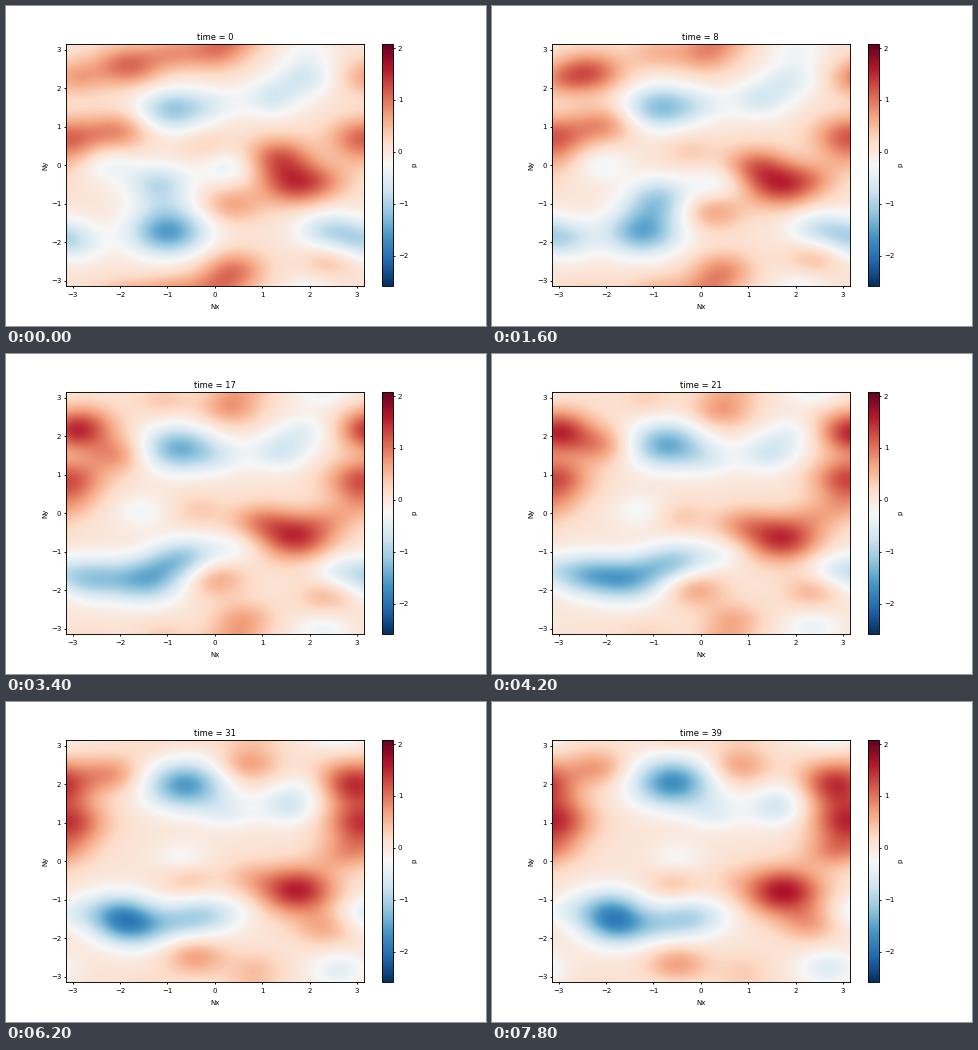
Recreate the animation shown at these times as a matplotlib script. Size 480 by 320 pixels, loop 8 s.

```python
import numpy as np
import matplotlib.pyplot as plt
from matplotlib.animation import FuncAnimation

W, H, DPI = 480, 320, 50
FRAMES, STEP_MS = 40, 200
VMIN, VMAX = -2.58, 2.07
BASE = 0.05
STRETCH = 1.15

plt.rcParams.update({
    "font.family": "DejaVu Sans",
    "axes.linewidth": 1.3,
    "xtick.major.width": 1.3,
    "ytick.major.width": 1.3,
    "xtick.major.pad": 5.5,
})

axis = np.linspace(-np.pi, np.pi, 128)
X, Y = np.meshgrid(axis, axis)


def ease_out(u):
    return np.sin(np.pi * u / 2)


def smooth(u):
    return u * u * (3 - 2 * u)


def wrap(d):
    return (d + np.pi) % (2 * np.pi) - np.pi


def vortex(start, end, strength, ease=smooth):
    """A periodic bump drifting from start to end; stronger ones are wider."""
    start, end = np.array(start), np.array(end)

    def value(u):
        x, y = start + (end - start) * ease(u)
        a = strength[0] + (strength[1] - strength[0]) * u
        r = 0.45 + 0.17 * abs(a)
        dx, dy = wrap(X - x) / STRETCH, wrap(Y - y) * STRETCH
        return a * np.exp(-(dx * dx + dy * dy) / r ** 2)

    return value


VORTICES = [
    # warm, upper half
    vortex((-1.85, 2.6), (-3.45, 2.05), (1.0, 1.3), ease_out),
    vortex((3.14, 0.7), (3.14, 1.05), (1.0, 1.4)),
    vortex((3.2, 0.1), (3.1, 0.3), (0.2, 0.5)),
    vortex((-2.05, 0.9), (-2.2, 2.45), (0.75, 0.65)),
    vortex((3.3, 2.3), (3.1, 1.7), (0.6, 0.1)),
    vortex((0.0, 2.95), (0.8, 2.5), (0.7, 0.65)),
    vortex((-0.9, 2.95), (-1.4, 3.0), (0.55, 0.0)),
    vortex((-0.2, 0.5), (-0.6, -0.6), (0.25, 0.35)),
    # warm, lower half
    vortex((1.35, 0.2), (0.7, -0.45), (1.0, 0.15), ease_out),
    vortex((1.7, -0.5), (1.75, -0.8), (1.2, 1.6)),
    vortex((2.4, -0.4), (2.6, 0.2), (0.35, 0.35)),
    vortex((0.35, -1.05), (-0.5, -2.7), (0.6, 0.65)),
    vortex((0.4, -2.75), (0.9, -2.85), (0.85, 0.25)),
    vortex((2.45, -2.5), (2.3, -1.65), (0.4, 0.55)),
    # cold, upper half
    vortex((-0.9, 1.45), (-0.6, 2.05), (-1.15, -1.75)),
    vortex((0.0, 1.6), (0.3, 1.25), (-0.35, -0.45)),
    vortex((1.2, 1.75), (1.6, 1.4), (-0.65, -0.7)),
    vortex((1.9, 2.3), (1.9, 1.9), (-0.65, -0.2)),
    vortex((2.0, 3.0), (2.7, 3.47), (-0.3, -0.6)),
    vortex((-2.3, 0.0), (-0.5, 0.1), (-0.4, -0.3)),
    # cold, lower half
    vortex((-1.0, -1.75), (-1.75, -1.75), (-1.6, -1.0), ease_out),
    vortex((-3.1, -2.0), (-1.95, -1.3), (-0.85, -1.3)),
    vortex((-1.2, -0.5), (-0.25, -1.5), (-0.9, -0.95), ease_out),
    vortex((-1.05, -1.1), (-0.95, -1.7), (-0.2, -0.4)),
    vortex((0.3, -0.05), (0.5, -1.4), (-0.5, -0.15), ease_out),
    vortex((2.4, -1.7), (3.2, -1.3), (-0.8, -0.3)),
]


def field(i):
    u = i / (FRAMES - 1)
    return BASE + sum(v(u) for v in VORTICES)


fig, ax = plt.subplots(figsize=(W / DPI, H / DPI), dpi=DPI)
fig.subplots_adjust(left=0.125, right=0.9, bottom=0.125, top=0.88)
img = ax.imshow(field(0), cmap="RdBu_r", vmin=VMIN, vmax=VMAX,
                origin="lower", extent=(-np.pi, np.pi, -np.pi, np.pi),
                aspect="auto", interpolation="bilinear")
ax.set_xticks(range(-3, 4))
ax.set_yticks(range(-3, 4))
ax.set_xlabel("Nx", labelpad=8)
ax.set_ylabel("Ny")
title = ax.set_title("time = 0", pad=7)
fig.colorbar(img, ax=ax, label="p", ticks=range(-2, 3), aspect=22.5)


def update(i):
    img.set_data(field(i))
    title.set_text(f"time = {i}")
    return img, title


anim = FuncAnimation(fig, update, frames=FRAMES, interval=STEP_MS,
                     repeat=True, repeat_delay=0)
plt.show()
```
